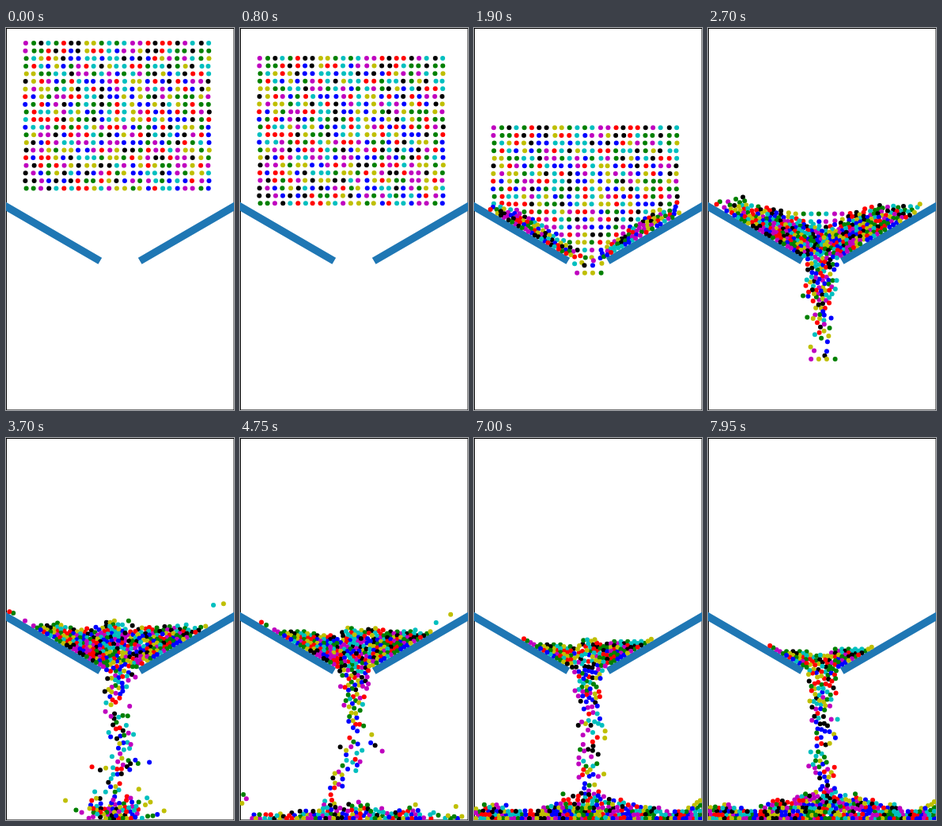
Write an HTML page with a canvas that moves like this. It is 288 px wide and 480 px high and loops after 8 s.

```html
<!DOCTYPE html>
<html lang="en">
<head>
<meta charset="utf-8">
<title>Grains in a funnel</title>
<style>
  html, body { margin: 0; width: 100%; height: 100%; overflow: hidden; background: #fff; }
  canvas { display: block; width: 288px; height: 480px; }
</style>
</head>
<body>
<canvas id="stage" width="288" height="480"></canvas>
<script>
const W = 288, H = 480, LOOP = 8000, HOLD = 50;
const FRAMES = LOOP / HOLD, SUBSTEPS = 30, DT = HOLD / 1000 / SUBSTEPS;

// Physics in pixels and seconds, unit mass
const GRAVITY = 58.8, STIFF = 20000, DAMP = 50, SHEAR = 70;
const RADIUS = 2.4, DIAMETER = 2 * RADIUS, REACH = DIAMETER + 2.4;
const FRICTION = { grain: 0.22, funnel: 0.1, floor: 0.12, side: 0.1 };
const FLOOR_Y = 478, SIDE_X = 2.2;
const SLOPE = Math.tan(Math.PI / 6), WALL_Y = 224.2, WALL_HALF = 4.8, WALL_START = -10, WALL_END = 118.4;

const COLS = 25, ROWS = 20, COUNT = COLS * ROWS;
const COLORS = { b: '#0000ff', g: '#008000', r: '#ff0000', c: '#00bfbf', m: '#bf00bf', y: '#bfbf00', k: '#000000' };
const TOP_ROW = 'mgkcgrkkyygcgcmmrkrrkmckc';
const COLUMN_X = [25, 35, 44.5, 53.5, 63.5, 73, 82.3, 91.5, 102, 110.8, 120.7, 130.5, 140, 149.3,
  160, 169.3, 179.5, 188.5, 197.8, 206.8, 216.8, 226, 235.6, 246.7, 256];

let seed = 20117;
function random() {
  seed = (Math.imul(seed, 1664525) + 1013904223) >>> 0;
  return seed / 4294967296;
}

const x = new Float64Array(COUNT), y = new Float64Array(COUNT);
const vx = new Float64Array(COUNT), vy = new Float64Array(COUNT);
const fx = new Float64Array(COUNT), fy = new Float64Array(COUNT);
const colors = [];

for (let i = 0; i < COUNT; i++) {
  const row = Math.floor(i / COLS), col = i % COLS;
  x[i] = COLUMN_X[col] + (random() - 0.5) * (row ? 1.6 : 0.2);
  y[i] = 19.1 + 9.6 * row;
  const key = row ? 'bgrcmyk'[Math.floor(random() * 7)] : TOP_ROW[col];
  colors.push(COLORS[key]);
}

// Push grain i along the normal; j is the other grain, or -1 for a fixed surface
function contact(i, j, nx, ny, overlap, mu) {
  const ux = vx[i] - (j < 0 ? 0 : vx[j]), uy = vy[i] - (j < 0 ? 0 : vy[j]);
  const normal = Math.max(0, STIFF * overlap - DAMP * (ux * nx + uy * ny));
  const limit = mu * normal;
  const shear = Math.max(-limit, Math.min(limit, -SHEAR * (uy * nx - ux * ny)));
  const px = normal * nx - shear * ny, py = normal * ny + shear * nx;
  fx[i] += px;
  fy[i] += py;
  if (j >= 0) {
    fx[j] -= px;
    fy[j] -= py;
  }
}

function touchFunnel(i, side) {
  const mx = side > 0 ? x[i] : W - x[i];
  const along = (mx + SLOPE * (y[i] - WALL_Y)) / (1 + SLOPE * SLOPE);
  const wx = Math.max(WALL_START, Math.min(WALL_END, along));
  const dx = mx - wx, dy = y[i] - WALL_Y - SLOPE * wx;
  const dist = Math.hypot(dx, dy) || 1e-6;
  const overlap = WALL_HALF + RADIUS - dist;
  if (overlap > 0) contact(i, -1, side * dx / dist, dy / dist, overlap, FRICTION.funnel);
}

function touchSurfaces(i) {
  if (y[i] > FLOOR_Y) contact(i, -1, 0, -1, y[i] - FLOOR_Y, FRICTION.floor);
  if (x[i] < SIDE_X) contact(i, -1, 1, 0, SIDE_X - x[i], FRICTION.side);
  if (x[i] > W - SIDE_X) contact(i, -1, -1, 0, x[i] - W + SIDE_X, FRICTION.side);
  if (y[i] > 205 && y[i] < 305) touchFunnel(i, x[i] < W / 2 ? 1 : -1);
}

let pairs = [];
function findPairs() {
  pairs = [];
  for (let i = 0; i < COUNT; i++) {
    for (let j = i + 1; j < COUNT; j++) {
      const dy = y[i] - y[j];
      if (dy > REACH || dy < -REACH) continue;
      const dx = x[i] - x[j];
      if (dx * dx + dy * dy < REACH * REACH) pairs.push(i, j);
    }
  }
}

function step() {
  fx.fill(0);
  fy.fill(GRAVITY);
  for (let p = 0; p < pairs.length; p += 2) {
    const i = pairs[p], j = pairs[p + 1];
    const dx = x[i] - x[j], dy = y[i] - y[j], square = dx * dx + dy * dy;
    if (square >= DIAMETER * DIAMETER) continue;
    const dist = Math.sqrt(square) || 1e-6;
    contact(i, j, dx / dist, dy / dist, DIAMETER - dist, FRICTION.grain);
  }
  for (let i = 0; i < COUNT; i++) {
    touchSurfaces(i);
    vx[i] += fx[i] * DT;
    vy[i] += fy[i] * DT;
    x[i] += vx[i] * DT;
    y[i] += vy[i] * DT;
  }
}

// The whole run is computed once, so each picture depends on time alone
const poses = [];
for (let n = 0; n < FRAMES; n++) {
  poses.push({ x: Float32Array.from(x), y: Float32Array.from(y) });
  for (let s = 0; s < SUBSTEPS; s++) {
    if (s % 6 === 0) findPairs();
    step();
  }
}

const ctx = document.getElementById('stage').getContext('2d');

function drawBox() {
  ctx.fillStyle = '#fff';
  ctx.fillRect(0, 0, W, H);
  ctx.strokeStyle = '#000';
  ctx.lineWidth = 1;
  ctx.strokeRect(0.5, 0.5, W - 0.5, H - 0.5);
}

function drawWalls() {
  const tip = 118.8;
  ctx.strokeStyle = '#1f77b4';
  ctx.lineWidth = 9.4;
  ctx.beginPath();
  for (const at of [v => v, v => W - v]) {
    ctx.moveTo(at(WALL_START), WALL_Y + SLOPE * WALL_START);
    ctx.lineTo(at(tip), WALL_Y + SLOPE * tip);
  }
  ctx.stroke();
}

function drawGrains(pose) {
  for (let i = 0; i < COUNT; i++) {
    ctx.fillStyle = colors[i];
    ctx.beginPath();
    ctx.arc(pose.x[i], pose.y[i], 3, 0, 2 * Math.PI);
    ctx.fill();
  }
}

const start = performance.now();
function play() {
  const time = (performance.now() - start) % LOOP;
  drawBox();
  drawWalls();
  drawGrains(poses[Math.floor(time / HOLD)]);
  requestAnimationFrame(play);
}
play();
</script>
</body>
</html>
```
